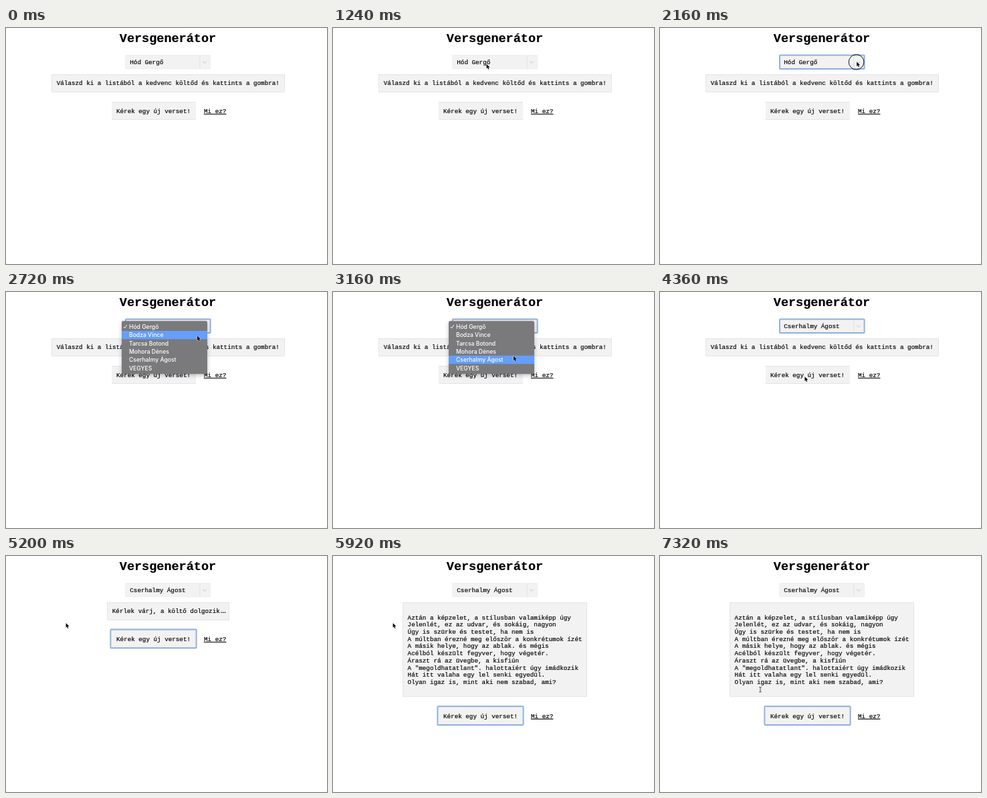
Animation, 480 px wide and 352 px high, one loop 7.36 s. Source, as an HTML page:

```html
<!DOCTYPE html>
<html lang="hu">
<head>
<meta charset="utf-8">
<title>Versgenerátor</title>
<style>
  html, body { margin: 0; height: 100%; overflow: hidden; background: #d4d4d4; }
  svg { display: block; width: 480px; height: 352px; background: #fff; border-radius: 2px; }
  text { font: 9.25px "Liberation Mono", monospace; fill: #0c0c0c; stroke: #0c0c0c; stroke-width: .22px; }
  .title { font-size: 18.5px; font-weight: bold; fill: #000; }
  .link { text-decoration: underline; }
  .panel { fill: #f2f2f2; filter: drop-shadow(.7px .7px .5px rgba(0, 0, 0, .3)); }
  .select { fill: #f2f2f2; stroke: #ebebeb; stroke-width: .6; }
  .line { fill: none; stroke: #c4c4c4; stroke-width: 1; }
  .focus { fill: none; stroke: #8fb0e0; stroke-width: 2; }
  .menu { filter: drop-shadow(0 2px 3px rgba(0, 0, 0, .25)); }
  .menu text { font: 500 8.6px Inter, sans-serif; fill: #fff; stroke: none; }
  .ring { fill: none; stroke: #111; stroke-width: 1; }
</style>
</head>
<body>
<svg viewBox="0 0 480 352">
  <text class="title" x="169.8" y="21">Versgenerátor</text>

  <rect class="select" x="178.5" y="40.5" width="127" height="20.5" rx="1"/>
  <path class="line" d="M290 41V61" style="stroke:#e2e2e2"/>
  <path class="line" d="M294.2 49.8L297 52.4L299.8 49.8"/>
  <text id="choice" x="185.3" y="54"></text>
  <rect id="selectFocus" class="focus" x="179" y="40.5" width="126.6" height="20.5" rx="1"/>

  <rect id="panel" class="panel" y="69.3"/>
  <text id="ask" x="75.8" y="85.3">Válaszd ki a listából a kedvenc költőd és kattints a gombra!</text>
  <g id="wait">
    <text x="158.8" y="85.3">Kérlek várj, a költő dolgozik</text>
    <g id="dots"></g>
  </g>
  <g id="poem"></g>

  <g id="actions">
    <rect class="panel" x="158" y="110.3" width="126" height="26.2"/>
    <text x="165" y="127">Kérek egy új verset!</text>
    <rect id="buttonFocus" class="focus" x="156.4" y="109.4" width="128.2" height="27.8" rx="1"/>
    <text class="link" x="296" y="127">Mi ez?</text>
  </g>

  <g id="menu" class="menu">
    <rect x="173" y="43.3" width="128" height="79" rx="2" fill="#7a7a7c"/>
    <rect id="row" x="173" width="128" height="12.3" fill="#659efb"/>
    <path d="M176 52L177.6 54L180.6 49.2" fill="none" stroke="#fff"/>
  </g>

  <g id="cursor">
    <circle id="ring" class="ring" cx="-.6" cy=".4" r="11.3"/>
    <path id="arrow" d="M0 0V6.7L1.5 5.3L2.6 7.9L3.8 7.4L2.7 4.9H4.9Z"
      fill="#000" stroke="#fff" stroke-width=".8" paint-order="stroke"/>
    <path id="beam" d="M-1.8 -3.8Q0 -3.8 0 -2.8Q0 -3.8 1.8 -3.8M0 -2.8V2.8M-1.8 3.8Q0 3.8 0 2.8Q0 3.8 1.8 3.8"
      fill="none" stroke="#333" stroke-width=".9"/>
  </g>
</svg>
<script>
const LOOP = 7360, STEP = 40, ROW_TOP = 45.7, ROW_H = 12.3;
const poets = ['Hód Gergő', 'Bodza Vince', 'Tarcsa Botond', 'Mohora Dénes', 'Cserhalmy Ágost', 'VEGYES'];
const verse = [
  'Aztán a képzelet, a stílusban valamiképp úgy',
  'Jelenlét, ez az udvar, és sokáig, nagyon',
  'Úgy is szürke és testet, ha nem is',
  'A múltban érezné meg először a konkrétumok ízét',
  'A másik helye, hogy az ablak. és mégis',
  'Acélból készült fegyver, hogy végetér.',
  'Áraszt rá az üvegbe, a kisfiún',
  'A "megoldhatatlant". halottaiért úgy imádkozik',
  'Hát itt valaha egy lel senki egyedül.',
  'Olyan igaz is, mint aki nem szabad, ami?'
];
// Pointer stops: time, x, y
const stops = [
  [0, 174, 308], [480, 246, 19], [760, 228.6, 60], [960, 229.6, 53.8],
  [1680, 229.6, 53.8], [2080, 294.2, 50.4],
  [2440, 294.2, 50.4], [3160, 270, 95.6],
  [3240, 270, 95.6], [3480, 267.2, 98.3],
  [4000, 267.2, 98.3], [4400, 215, 127],
  [4640, 215, 127], [5200, 89.6, 100],
  [7200, 89.6, 100], [7320, 150, 199.2], [LOOP, 150, 199.2]
];
const clicks = [[1120, 1240], [2120, 2240], [3520, 3640], [4400, 4680]];

const $ = id => document.getElementById(id);
const show = (id, on) => $(id).style.display = on ? '' : 'none';
const within = (t, a, b) => t >= a && t < b;

function add(parent, tag, attrs, text = '') {
  const el = document.createElementNS('http://www.w3.org/2000/svg', tag);
  for (const name in attrs) el.setAttribute(name, attrs[name]);
  el.textContent = text;
  return $(parent).appendChild(el);
}

function pointer(t) {
  const i = stops.findIndex(s => s[0] > t);
  const [t0, x0, y0] = stops[i - 1], [t1, x1, y1] = stops[i];
  const p = (t - t0) / (t1 - t0), e = p * p * (3 - 2 * p);
  return [x0 + (x1 - x0) * e, y0 + (y1 - y0) * e];
}

function setPanel(x, width, height) {
  Object.entries({ x, width, height }).forEach(([k, v]) => $('panel').setAttribute(k, v));
}

poets.forEach((name, i) => add('menu', 'text', { x: 184, y: 55.1 + i * ROW_H }, name));
verse.forEach((line, i) => add('poem', 'text', { x: 111.6, y: 94.5 + i * 10.74 }, line));
const dots = [0, 1, 2].map(i => add('dots', 'text', { x: 319.4 + i * 2.7, y: 85.3, 'font-weight': 'bold' }, '.'));

function draw(t) {
  const [x, y] = pointer(t);
  const waiting = within(t, 4440, 5600), done = t >= 5600;

  $('choice').textContent = poets[t < 4000 ? 0 : 4];
  show('selectFocus', within(t, 2120, 4440));
  show('buttonFocus', t >= 4440);

  if (done) setPanel(104.5, 275, 140.2);
  else if (waiting) setPanel(151.5, 182, 26.4);
  else setPanel(68.5, 348, 26.4);
  show('ask', t < 4440);
  show('wait', waiting);
  show('poem', done);
  const count = Math.floor((t - 4440) / 230) % 4;
  dots.forEach((dot, i) => dot.style.display = i < count ? '' : 'none');
  $('actions').setAttribute('transform', `translate(0 ${done ? 114.8 : 0})`);

  show('menu', within(t, 2200, 4000));
  $('menu').style.opacity = Math.min(1, (4000 - t) / 270);
  const row = Math.max(0, Math.min(5, Math.floor((y - ROW_TOP) / ROW_H)));
  $('row').setAttribute('y', ROW_TOP + row * ROW_H);
  show('row', !within(t, 3640, 3720));

  const beam = t >= 7280;
  show('cursor', t >= 40);
  $('cursor').setAttribute('transform', `translate(${x} ${y})`);
  show('ring', clicks.some(([a, b]) => within(t, a, b)));
  show('arrow', !beam);
  show('beam', beam);
}

const start = performance.now();
function tick() {
  const t = (performance.now() - start) % LOOP;
  draw(Math.floor(t / STEP) * STEP);
  requestAnimationFrame(tick);
}
tick();
</script>
</body>
</html>
```
